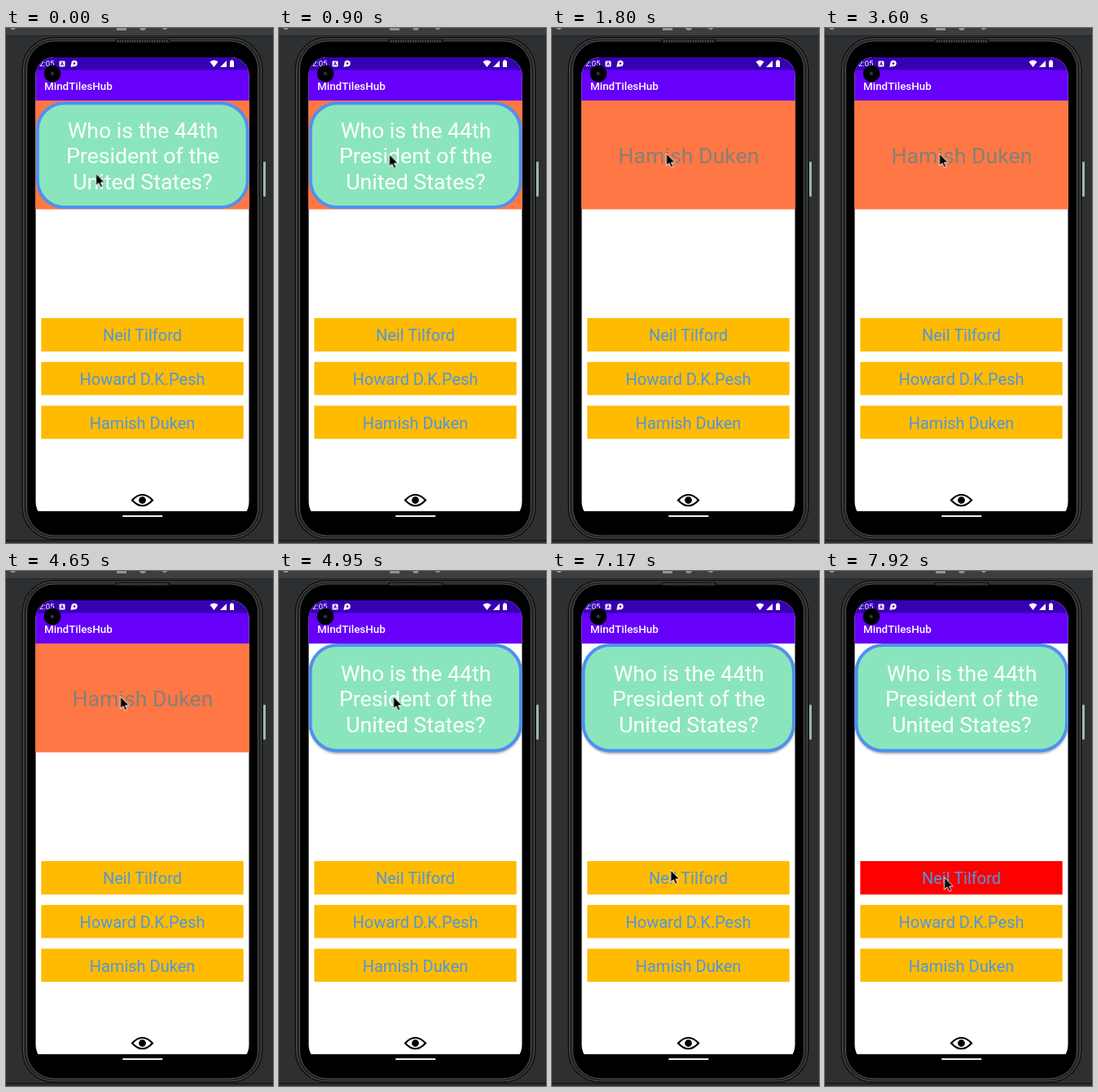
An HTML page for the animation above (8 s loop, 328 by 632 pixels).

```html
<!DOCTYPE html>
<html lang="en">
<head>
<meta charset="utf-8">
<title>Quiz card on a phone</title>
<style>
  html, body { margin: 0; width: 100%; height: 100%; overflow: hidden; background: #2d2f31; }
  svg { display: block; width: 328px; height: 632px; }
  text { font-family: Roboto, "Open Sans", sans-serif; }
  .title { font-size: 13.4px; font-weight: 500; fill: #fff; }
  .clock { font-size: 9.5px; fill: #fff; }
  .big { font-size: 26.7px; text-anchor: middle; }
  .question { fill: #fff; }
  .reply { fill: #858078; }
  .choice { font-size: 20px; text-anchor: middle; fill: #5096dc; }
  .card { fill: #8ae5bc; stroke: #4f90f0; stroke-width: 4; }
  .button { fill: #fb0; }

  .loop { animation: 8s step-end infinite; }
  .back { animation-name: back; }
  .first { animation-name: first; }
  .second { animation-name: second; }
  .prompt { animation-name: prompt; }
  .answer { animation-name: answer; }
  .wrong { animation-name: wrong; }
  .cursor { animation-name: move; }

  @keyframes back { 0% { opacity: 1 } 61.875%, 100% { opacity: 0 } }
  @keyframes first { 0% { opacity: 1 } 22.5%, 100% { opacity: 0 } }
  @keyframes second { 0% { opacity: 0 } 61.875%, 100% { opacity: 1 } }
  @keyframes prompt { 0% { opacity: 1 } 22.5% { opacity: 0 } 61.875%, 100% { opacity: 1 } }
  @keyframes answer { 0% { opacity: 0 } 22.5% { opacity: 1 } 61.875%, 100% { opacity: 0 } }
  @keyframes wrong { 0% { fill: #fb0 } 91.5%, 100% { fill: #f00 } }
  @keyframes move {
    0% { transform: translate(110.5px, 178.5px) }
    9.375% { transform: translate(114.5px, 174.5px) }
    11.25% { transform: translate(135.5px, 155px) }
    13.125% { transform: translate(140.5px, 154px) }
    73% { transform: translate(140.5px, 154.5px) }
    74.875% { transform: translate(143px, 176px) }
    76.75% { transform: translate(147px, 225.5px) }
    78.625% { transform: translate(147px, 321px) }
    80.375% { transform: translate(145.3px, 348.5px) }
    82.25% { transform: translate(145.3px, 366.5px) }
    84% { transform: translate(145.8px, 367px) }
    99%, 100% { transform: translate(146.6px, 376px) }
  }
</style>
</head>
<body>
<svg viewBox="0 0 328 632">
  <defs>
    <filter id="blur" x="-10%" y="-10%" width="120%" height="125%">
      <feGaussianBlur stdDeviation="1.6"/>
    </filter>
    <clipPath id="screen">
      <rect x="36.5" y="36" width="262" height="568" rx="22"/>
    </clipPath>
  </defs>

  <!-- Emulator window -->
  <path fill="#3b3f42" d="M0 0H328V9H0Z"/>
  <path fill="#222426" d="M0 9H328V10H0Z"/>
  <g fill="#8f9396">
    <path d="M5 0H12L10 2H7ZM136 0H148V3H136Z"/>
    <path d="M191 0H199L195 2.5Z"/>
    <circle cx="168" cy="-1" r="4"/>
  </g>
  <path fill="#17191a" d="M0 628H328V629.5H0Z"/>

  <!-- Phone body -->
  <rect x="316" y="164" width="3" height="43" rx="1.2" fill="#9ab8b0"/>
  <rect x="19.5" y="11" width="296" height="617" rx="39" fill="#101011"/>
  <g stroke="#505152">
    <rect x="21.5" y="13" width="292" height="613" rx="37" fill="#222324"/>
    <rect x="25.5" y="16" width="284" height="607" rx="34"/>
  </g>
  <rect x="134" y="13.5" width="68" height="5" rx="2.5" fill="#17181a"/>
  <path d="M137 16H199" stroke="#55585a" stroke-width="2" stroke-dasharray="1.5 1.5"/>

  <!-- App -->
  <g clip-path="url(#screen)">
    <path fill="#fff" d="M36 36H299V593H36Z"/>
    <path fill="#3700b3" d="M36 36H299V52H36Z"/>
    <path fill="#6600fa" d="M36 51.5H299V89H36Z"/>
    <path class="loop back" fill="#ff7744" d="M36 89H299V222.5H36Z"/>
    <g class="loop second">
      <rect x="38" y="91" width="260" height="133" rx="34" fill="#000" opacity=".38" filter="url(#blur)"/>
      <rect class="card" x="38.5" y="91" width="258.5" height="129.5" rx="33"/>
    </g>
    <rect class="card loop first" x="38.7" y="92.2" width="258" height="127.8" rx="33"/>
    <g class="loop prompt big question">
      <text x="168" y="135">Who is the 44th</text>
      <text x="168" y="166.3">President of the</text>
      <text x="168" y="197.5">United States?</text>
    </g>
    <text class="loop answer big reply" x="168" y="166.3">Hamish Duken</text>

    <text class="title" x="47" y="75.8">MindTilesHub</text>
    <text class="clock" x="41" y="47">2:05</text>
    <g fill="#fff">
      <rect x="65.5" y="40.5" width="7" height="7" rx="1"/>
      <circle cx="84" cy="43.5" r="3.7"/>
      <path d="M79.5 48L80 43.5L84 47ZM250.5 41.5Q255.5 37.5 260.5 41.5L255.5 48ZM263 48L271 40V48Z"/>
      <path d="M275 40.5H276.3V39.3H278.7V40.5H280V48H275Z"/>
    </g>
    <path d="M67.3 46.2L69 41.8L70.7 46.2M68 44.8H70" fill="none" stroke="#3700b3" stroke-width=".9"/>
    <circle cx="84" cy="43.5" r="1.3" fill="#3700b3"/>

    <rect class="button loop wrong" x="43.3" y="356" width="248.4" height="41"/>
    <rect class="button" x="43.3" y="409.8" width="248.4" height="40.7"/>
    <rect class="button" x="43.3" y="463.5" width="248.4" height="40.7"/>
    <g class="choice">
      <text x="167.5" y="384">Neil Tilford</text>
      <text x="167.5" y="438">Howard D.K.Pesh</text>
      <text x="167.5" y="491.8">Hamish Duken</text>
    </g>

    <path d="M155 579.5Q167.5 566 180 579.5Q167.5 593 155 579.5Z" fill="#fff" stroke="#000" stroke-width="2.2"/>
    <circle cx="167.5" cy="579.5" r="4.4"/>
  </g>

  <circle cx="57" cy="56" r="10.4"/>
  <circle cx="57" cy="56" r="2.5" fill="#202124"/>
  <circle cx="56.5" cy="55.5" r=".8" fill="#686b70"/>
  <path d="M144 599H191.5" stroke="#eee" stroke-width="2" stroke-linecap="round"/>

  <path class="loop cursor" d="M0 0V15L3.4 11.8L6 17.3L8.4 16.2L6 11H10.6Z" stroke="#fff" stroke-width=".9"/>
</svg>
</body>
</html>
```
